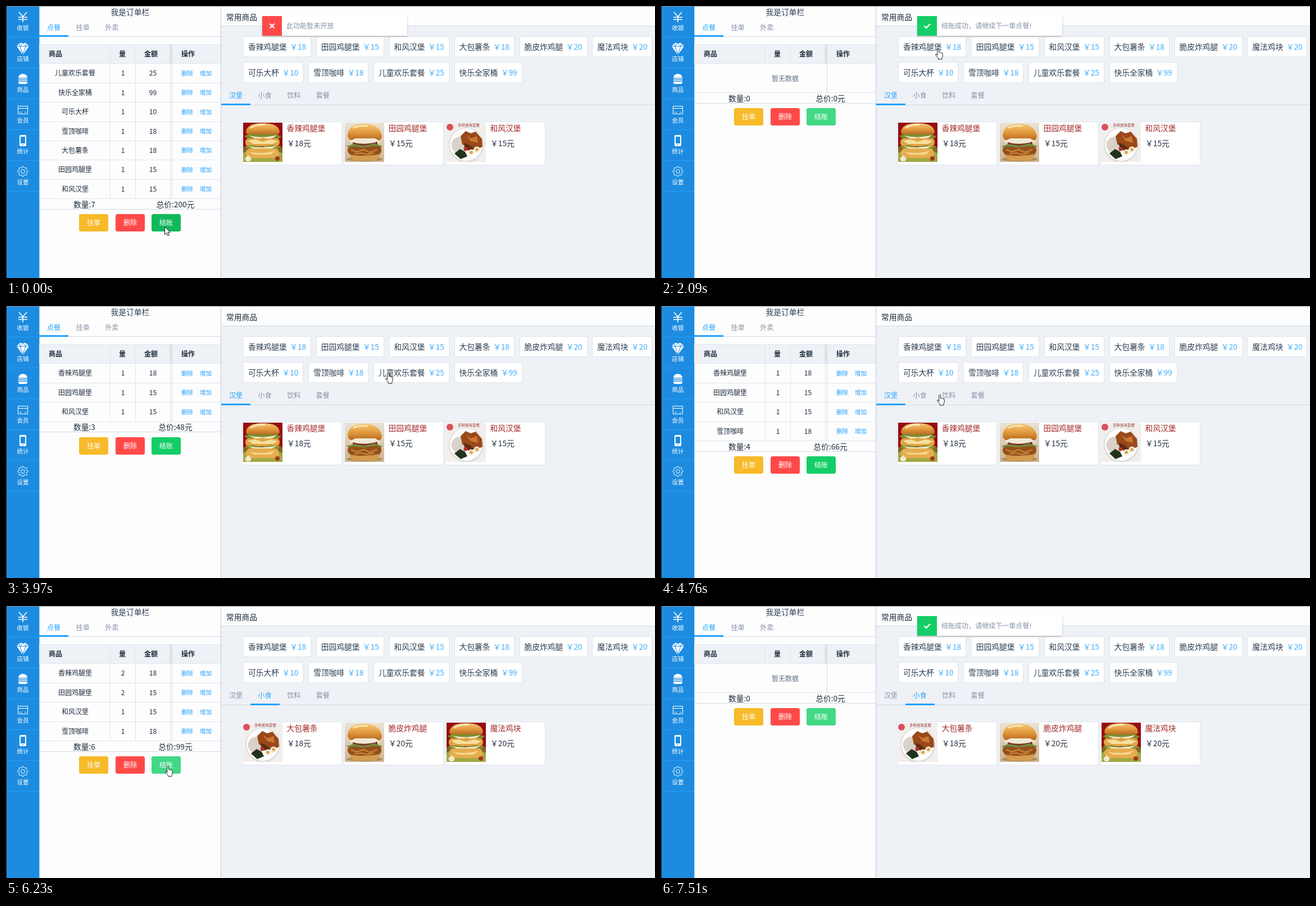
An HTML page for the animation above (8310 ms loop, 1155 by 485 pixels).

```html
<!DOCTYPE html>
<html lang="zh-CN">
<head>
<meta charset="utf-8">
<style>
html, body { margin: 0; width: 100%; height: 100%; overflow: hidden; background: #eef1f6; }
svg { display: block; width: 1155px; height: 485px; font-family: "Noto Sans CJK SC", "Noto Sans CJK", "Noto Sans", sans-serif; }
</style>
</head>
<body>
<svg id="stage" viewBox="0 0 1155 485" xmlns="http://www.w3.org/2000/svg">
  <defs>
    <filter id="shadow" x="-10%" y="-30%" width="120%" height="180%">
      <feDropShadow dx="0" dy="1.5" stdDeviation="1.5" flood-opacity=".25"/>
    </filter>
    <linearGradient id="bun" x2="0" y2="1"><stop stop-color="#f3c878"/><stop offset=".5" stop-color="#e39a3e"/><stop offset="1" stop-color="#b4671f"/></linearGradient>
    <linearGradient id="table" x2="0" y2="1"><stop stop-color="#e9e3d6"/><stop offset="1" stop-color="#cdb48e"/></linearGradient>
    <clipPath id="photo"><rect width="70" height="70"/></clipPath>
    <g id="spicy">
      <rect width="70" height="70" fill="#960d12"/>
      <path d="M0 44H70V70H0Z" fill="#7d6a25"/>
      <path d="M0 54l10-5 10 9 30 1 10-8 10 3v16H0Z" fill="#a3a845"/>
      <path d="M5 17Q6 1 35 1T65 17Q64 21 60 22H10Q6 21 5 17Z" fill="url(#bun)"/>
      <path d="M14 9Q23 3 38 4" fill="none" stroke="#fae4b0" stroke-width="3" stroke-linecap="round"/>
      <path d="M2 24l9-4 47 1 10 3-6 6-12-3-11 4-13-4-14 4Z" fill="#7f8b2c"/>
      <path d="M10 23q25 6 50-1l-6 5-10 2-9-2-10 3Z" fill="#f2ead0"/>
      <rect x="4" y="28" width="61" height="14" rx="6" fill="#e0a445"/>
      <path d="M8 32l14-2 12 4 15-4 13 3-9 5H18Z" fill="#f6df9d"/>
      <path d="M2 42l16-2 16 3 16-3 18 2-8 6-25 2-24-2Z" fill="#8d912f"/>
      <path d="M9 42q25 5 52-1l-10 5H18Z" fill="#f3ebd0"/>
      <rect x="5" y="46" width="59" height="17" rx="8" fill="#e6ad4f"/>
      <path d="M12 52q22 5 45-2l-8 7H20Z" fill="#f5d78e"/>
      <path d="M3 64l6-6 6 6-3 5H6Z" fill="#f2e8ce"/>
      <circle cx="61" cy="64" r="4" fill="#a8341c"/>
    </g>
    <g id="garden">
      <rect width="70" height="70" fill="url(#table)"/>
      <ellipse cx="35" cy="65" rx="32" ry="4" fill="#a98a62"/>
      <path d="M5 22Q7 2 34 2T66 23Q66 30 60 32L11 31Q5 29 5 22Z" fill="url(#bun)"/>
      <path d="M16 9Q26 4 40 6" fill="none" stroke="#fae4b0" stroke-width="3" stroke-linecap="round"/>
      <path d="M8 33l11-5h35l10 6-10 6-20 1-18-2Z" fill="#efe9d6"/>
      <path d="M14 35q20 6 44-1v5q-22 6-44 0Z" fill="#7e302c"/>
      <path d="M3 42l13-4 18 3 19-4 14 5-6 5H10Z" fill="#76883a"/>
      <path d="M5 47Q8 41 20 43T36 44 52 42 65 47Q66 56 57 59H14Q4 55 5 47Z" fill="#93501c"/>
      <path d="M11 48l10 4 13-4 10 5 14-5M17 56l12-2 11 3 12-3" fill="none" stroke="#c67e35" stroke-width="2.6"/>
      <path d="M9 57q26 5 53-1Q61 68 49 68H22Q10 68 9 57Z" fill="#d59b50"/>
    </g>
    <g id="plate">
      <rect width="70" height="70" fill="#f1eeec"/>
      <circle cx="35" cy="40" r="31" fill="#dddcdb"/>
      <circle cx="35" cy="39" r="29" fill="#fdfcfc"/>
      <path d="M9 36q6-15 24-10l4 24-18 5Q7 48 9 36Z" fill="#d9d2ca"/>
      <path d="M25 24l9-9 9 4 9-3 11 13 1 14-13 6-12-7-11-3Z" fill="#99491a"/>
      <path d="M35 21l8 7 11-4 2 12-13-3Z" fill="#cc7732"/>
      <path d="M31 36l10 4 8 7-8 4-9-6Z" fill="#5d2c12"/>
      <path d="M14 55l10-8 9 5 4 8-12 5Z" fill="#22331b"/>
      <g fill="#f5eee3"><circle cx="44" cy="53" r="5.5"/><circle cx="54" cy="48" r="5.5"/></g>
      <g fill="#dda03d"><circle cx="44" cy="53" r="2.8"/><circle cx="54" cy="48" r="2.8"/></g>
      <circle cx="34" cy="47" r="3.5" fill="#b73225"/>
      <circle cx="6" cy="8" r="6" fill="#d9505a"/>
      <text x="20" y="7" font-size="6.5" fill="#a04848">多种美味套餐</text>
    </g>
    <path id="arrow" d="M.5.5V14.5L3.7 11.5 6 16.7 8.2 15.7 6 10.7H10.3Z" fill="#fff" stroke="#111" stroke-linejoin="round"/>
    <path id="hand" d="M3.8 12V2q0-1.5 1.4-1.5T6.6 2V6.6q1.2-.9 2.2.5 1.4-.7 2.2.6 1.9-.4 2.2 1.2V13q0 2.5-1.4 4v2H5.5V17Q2.5 14 .8 11.2.3 9.6 1.6 9.5 2.9 9.6 3.8 11.5Z" fill="#fff" stroke="#222" stroke-linejoin="round"/>
  </defs>
  <g id="base"></g>
  <g id="live"></g>
</svg>
<script>
const LOOP = 8310, BODY = 13.75, SMALL = 12.04;
const BLUE = '#20a0ff', INK = '#1f2d3d', GREY = '#8391a5', LINE = '#d1dbe5', PALE = '#dfe6ec';
const NAV = '#1d8ce0', RED = '#ff4949', GREEN = '#13ce66';

const menu = [
  ['香辣鸡腿堡', 18], ['田园鸡腿堡', 15], ['和风汉堡', 15], ['大包薯条', 18], ['脆皮炸鸡腿', 20],
  ['魔法鸡块', 20], ['可乐大杯', 10], ['雪顶咖啡', 18], ['儿童欢乐套餐', 25], ['快乐全家桶', 99]
];

// Screen refreshes: [first, last, count]
const runs = [
  [0], [120], [270, 770, 5], [910, 1270, 4], [1420, 1540, 2], [1690], [1830, 1950, 2], [2090, 2340, 3],
  [2890], [3040, 3280, 3], [3430], [3580, 3700, 2], [3850, 4220, 4], [4470], [4610], [4760],
  [4910, 5150, 3], [5300, 5420, 2], [5570, 5690, 2], [5840], [5990, 6470, 5], [6610],
  [6760, 7000, 3], [7150, 7510, 4]
];
const ticks = runs.flatMap(([a, b = a, n = 1]) =>
  Array.from({ length: n }, (_, i) => n > 1 ? Math.floor((a + (b - a) * i / (n - 1)) / 10) * 10 : a));

const path = [
  [120, 282, 393], [910, 401, 177], [1270, 361, 249], [1420, 334, 260], [1540, 392, 193], [1690, 465, 121],
  [1950, 488, 76], [3160, 488, 76], [3280, 516, 73], [3430, 592, 72], [3700, 696, 66], [3850, 696, 70],
  [3970, 675, 119], [4220, 553, 119], [4470, 550, 119], [4610, 511, 119], [4760, 491, 158], [4910, 505, 205],
  [5030, 510, 220], [5150, 696, 240], [5300, 655, 239], [5420, 510, 169], [5690, 449, 160], [5840, 440, 178],
  [6230, 283, 285]
];

const rect = (x, y, w, h, fill, more = '') => `<rect x="${x}" y="${y}" width="${w}" height="${h}" fill="${fill}" ${more}/>`;
const text = (x, cy, s, size, fill, anchor = 'start', weight = 400) =>
  `<text x="${x}" y="${cy + size * .37}" font-size="${size}" fill="${fill}" text-anchor="${anchor}" font-weight="${weight}">${s}</text>`;
const box = (x, y, w, h) => rect(x + .5, y + .5, w - 1, h - 1, '#fff', `stroke="${PALE}"`);
const tabs = (x, cy, labels, active) => labels.map((s, i) =>
  text(x + i * 51.6, cy, s, SMALL, i === active ? BLUE : GREY)).join('');

function gear() {
  const points = Array.from({ length: 32 }, (_, i) => {
    const r = i % 4 < 2 ? 9 : 7, a = (i - .5) * Math.PI / 16;
    return `${(r * Math.cos(a)).toFixed(2)},${(r * Math.sin(a)).toFixed(2)}`;
  });
  return `<polygon points="${points.join(' ')}" stroke-linejoin="round"/><circle r="3.3"/>`;
}

function sideNav() {
  const icons = [
    '<path d="M-7-9L0-1 7-9M0-1V9M-8 0H8M-8 4H8" stroke-width="1.6"/>',
    `<path d="M-6-9H6L11-3 0 12-11-3Z" fill="#fff" stroke="none"/><path d="M-11-3H11M-5-3L0 11 5-3M-7-9L-5-3 0-9 5-3 7-9" stroke="${NAV}"/>`,
    '<path d="M-8-2Q-7-9 0-9T8-2ZM-8 5H8V6Q8 9 5 9H-5Q-8 9-8 6Z" fill="#fff" stroke="none"/><path d="M-8 0H8M-8 3H8" stroke-width="1.6"/>',
    '<path d="M-8.5-6.5H8.5V7.5H-8.5ZM-8.5-2.5H8.5M-6 4.5H-2M3 4.5H6"/>',
    `<rect x="-6" y="-10" width="12" height="20" rx="2" fill="#fff" stroke="none"/><path d="M-4-7H4V5H-4Z" fill="${NAV}" stroke="none"/><circle cy="7.6" r="1" fill="${NAV}" stroke="none"/>`,
    gear()
  ];
  const names = ['收银', '店铺', '商品', '会员', '统计', '设置'];
  return rect(0, 0, 59.4, 485, NAV) + names.map((s, i) => {
    const y = 55 * i;
    return `<g transform="translate(30 ${y + 20})" fill="none" stroke="#fff">${icons[i]}</g>`
      + text(30, y + 39, s, 10.5, '#fff', 'middle') + rect(0, y + 55, 59, 1, BLUE);
  }).join('');
}

function quickPicks() {
  let x = 422, y = 54;
  return menu.map(([name, price], i) => {
    if (i === 6) { x = 422; y = 100; }
    const w = 52 + name.length * BODY;
    const out = box(Math.round(x), y, Math.round(w), 37) + text(x + 9, y + 19, name, BODY, '#2c3e50')
      + text(x + w - 8.5, y + 19, '￥' + price, BODY, '#43aefc', 'end');
    x += w + 9;
    return out;
  }).join('');
}

function tableHead() {
  const heads = [['商品', 76], ['量', 201], ['金额', 246], ['操作', 312]];
  return rect(59, 68, 323, 35, '#eef1f6') + rect(59, 68, 323, 1, PALE) + rect(59, 102, 323, 1, PALE)
    + rect(185, 69, 1, 33, PALE) + rect(230, 69, 1, 33, PALE) + rect(291, 69, 4, 33, '#dfe3ea')
    + heads.map(([s, x]) => text(x, 85.5, s, SMALL, INK, 'start', 700)).join('');
}

document.getElementById('base').innerHTML =
  rect(0, 0, 1155, 485, '#eef1f6') + rect(59, 0, 323, 485, '#fdfdfe') + sideNav()
  + rect(382, 0, 1, 485, '#c0ccda')
  + text(221, 11, '我是订单栏', BODY, '#2c3e50', 'middle')
  + rect(59, 54, 323, 1, LINE) + rect(59, 52, 52, 3, BLUE)
  + tabs(73, 38.5, ['点餐', '挂单', '外卖'], 0) + tableHead()
  + rect(383, 0, 772, 35, '#fcfdfe') + rect(383, 35, 772, 1, LINE)
  + text(392, 19.5, '常用商品', BODY, INK) + quickPicks()
  + rect(383, 176, 772, 1, LINE)
  + rect(0, 0, 1155, 1, '#8a8f94') + rect(0, 0, 1, 485, '#10181f');

function orderAt(t) {
  if (t < 120) return [8, 9, 6, 7, 3, 1, 2].map(id => ({ id, qty: 1 }));
  if (t >= 6760) return [];
  const adds = [[0, 3280, 5030], [1, 3580, 5300], [2, 3850, LOOP], [7, 4610, LOOP]];
  return adds.filter(a => t >= a[1]).map(([id, , again]) => ({ id, qty: t >= again ? 2 : 1 }));
}

function orderTable(order, t) {
  const rowEnd = n => 102.7 + 34.35 * n;
  const end = order.length ? rowEnd(order.length) : 154, bottom = Math.round(end);
  let out = rect(295, 69, 1, bottom - 69, '#d6dce4');
  order.forEach(({ id, qty }, i) => {
    const cy = rowEnd(i) + 17.3, [name, price] = menu[id];
    out += rect(59, Math.round(rowEnd(i + 1)), 323, 1, PALE)
      + text(123, cy, name, SMALL, INK, 'middle') + text(208, cy, qty, SMALL, INK, 'middle')
      + text(261.5, cy, price, SMALL, INK, 'middle')
      + text(312, cy, '删除', 10.6, BLUE) + text(345, cy, '增加', 10.6, BLUE);
  });
  if (order.length) out += [185, 230, 292].map(x => rect(x, 103, 1, bottom - 103, PALE)).join('');
  else out += text(221, 129.5, '暂无数据', SMALL, '#5e7382', 'middle') + rect(59, bottom, 323, 1, PALE);

  const count = order.reduce((n, o) => n + o.qty, 0);
  const total = order.reduce((n, o) => n + o.qty * menu[o.id][1], 0);
  out += text(139.5, end + 10.5, '数量:' + count, BODY, INK, 'middle')
    + text(301.5, end + 10.5, `总价:${total}元`, BODY, INK, 'middle')
    + rect(59, Math.round(end + 18.6), 323, 1, LINE);

  const pressed = t < 120 || t >= 6610 && t < 6760;
  const lit = t < 3040 || t >= 6230;
  const pay = pressed ? '#11b95c' : lit ? '#42d885' : GREEN;
  const top = Math.round(end + 28);
  [['挂单', '#f7ba2a'], ['删除', RED], ['结账', pay]].forEach(([s, fill], i) => {
    const x = Math.floor(130.5 + i * 64.5);
    out += rect(x, top, 52, 31, fill, 'rx="3.5"') + text(x + 26, top + 15.7, s, SMALL, '#fff', 'middle');
  });
  return out;
}

function products(t) {
  const snacks = t >= 5840;
  const ink = t < 5840 ? 0 : t < 5990 ? .5 : 1;
  const photos = snacks ? ['plate', 'garden', 'spicy'] : ['spicy', 'garden', 'plate'];
  return tabs(397, 160, ['汉堡', '小食', '饮料', '套餐'], snacks ? 1 : 0)
    + rect(Math.round(383 + ink * 51.6), 174, 52, 3, BLUE)
    + photos.map((photo, i) => {
      const x = Math.round(419.5 + i * 181.3), [name, price] = menu[i + (snacks ? 3 : 0)];
      return box(x, 206, 178, 78)
        + `<g transform="translate(${x + 2} 208)" clip-path="url(#photo)"><use href="#${photo}"/></g>`
        + text(x + 79.5, 218, name, BODY, '#a52a2a') + text(x + 80, 245, `￥${price}元`, BODY, INK);
    }).join('');
}

function toast(ok, lift = 0, opacity = 1) {
  const mark = ok ? 'M-5 0L-1.5 3.5 5.5-3.5' : 'M-4-4L4 4M4-4L-4 4';
  return `<g transform="translate(456 ${18 - lift})" opacity="${opacity}">`
    + rect(0, 0, 258, 35, '#fff', 'filter="url(#shadow)"') + rect(0, 0, 35, 35, ok ? GREEN : RED)
    + `<path transform="translate(17.5 17.5)" d="${mark}" fill="none" stroke="#fff" stroke-width="2.4"/>`
    + text(43, 18, ok ? '结账成功，请继续下一单点餐!' : '此功能暂未开放', SMALL, GREY) + '</g>';
}

function toasts(t) {
  const entering = start => {
    const p = Math.min(1, (t - start + 60) / 400), eased = 1 - (1 - p) ** 3;
    return toast(true, 36 * (1 - eased), Math.min(1, p * 1.33));
  };
  let out = t < 1420 ? toast(false) : '';
  if (t >= 120 && t < 2890) out += entering(120);
  else if (t >= 2890 && t < 3040) out += toast(true, 5, .6);
  else if (t >= 6760) out += entering(6760);
  return out;
}

function cursor(t) {
  if (t >= 6760) return '';
  const next = path.findIndex(k => k[0] > t);
  const b = path[next < 0 ? path.length - 1 : next], a = next > 0 ? path[next - 1] : b;
  const p = a === b ? 0 : (t - a[0]) / (b[0] - a[0]);
  const [x, y] = [1, 2].map(i => Math.round(a[i] + (b[i] - a[i]) * p));
  return `<use href="#${t < 1830 ? 'arrow' : 'hand'}" x="${x}" y="${y}"/>`;
}

const live = document.getElementById('live');
let shown = -1;
function draw() {
  const now = performance.now() % LOOP;
  const t = ticks.findLast(k => k <= now);
  if (t !== shown) {
    shown = t;
    live.innerHTML = orderTable(orderAt(t), t) + products(t) + toasts(t) + cursor(t);
  }
  requestAnimationFrame(draw);
}
draw();
</script>
</body>
</html>
```
